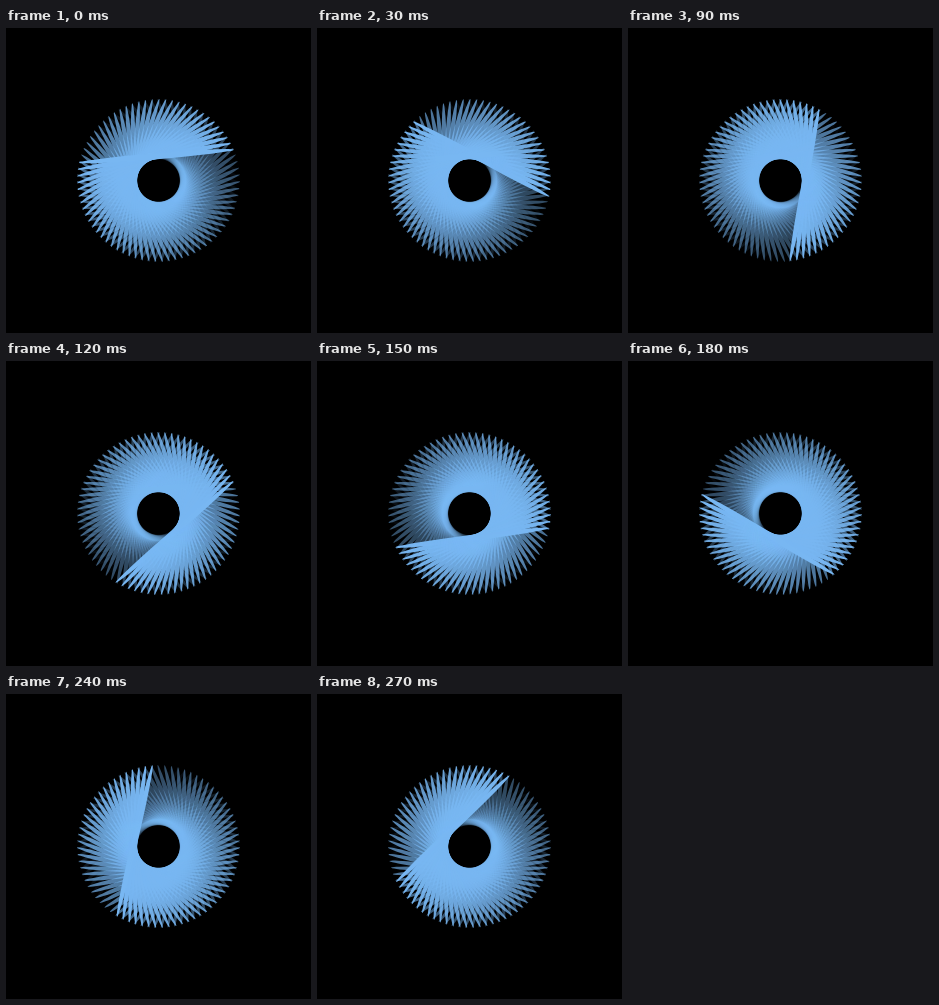
Animation of 305x305 px, one loop 300 ms. Source, as an HTML page:

```html
<!DOCTYPE html>
<html lang="en">
<head>
<meta charset="utf-8">
<title>Spinner</title>
<style>
  html, body { margin: 0; height: 100%; overflow: hidden; background: #000; }
  svg { display: block; width: 100vw; height: 100vh; }
</style>
</head>
<body>
<svg viewBox="0 0 100 100" fill="#78b7f2"></svg>
<script>
const BLADES = 75, LOOP = 300, STEP = 30;
const svg = document.querySelector('svg');

const blades = Array.from({ length: BLADES }, (_, i) => {
  const blade = document.createElementNS(svg.namespaceURI, 'ellipse');
  const attributes = {
    cx: 50, cy: 42, rx: 25.5, ry: 1,
    transform: `rotate(${i * 360 / BLADES} 50 50)`
  };
  for (const name in attributes) blade.setAttribute(name, attributes[name]);
  return svg.appendChild(blade);
});

// The bright head runs clockwise in ten steps; each blade fades linearly behind it.
function draw(now) {
  const turn = Math.floor(now % LOOP / STEP) * STEP / LOOP;
  blades.forEach((blade, i) => {
    const age = (turn + 1 - (i + 1) / BLADES + 1e-9) % 1;
    blade.setAttribute('opacity', 1 - age);
  });
  requestAnimationFrame(() => draw(performance.now() - start));
}

const start = performance.now();
draw(0);
</script>
</body>
</html>
```
